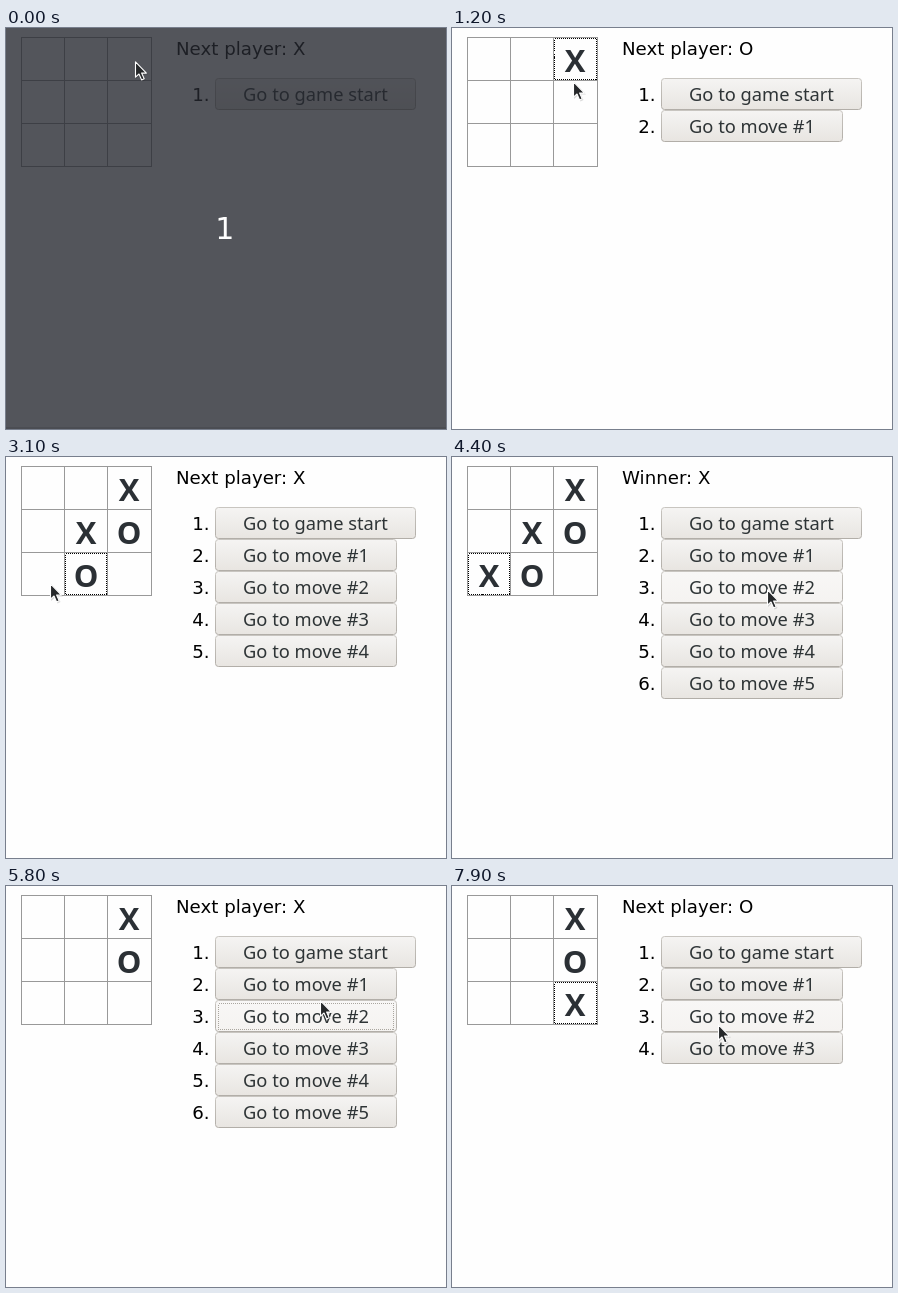
Write an HTML page that moves like this. It is 440x401 px and loops after 8 s.

```html
<!DOCTYPE html>
<html lang="en">
<head>
<meta charset="utf-8">
<title>Tic-tac-toe with move history</title>
<style>
  html, body { margin: 0; width: 100%; height: 100%; overflow: hidden; background: #fefefe; }
  svg { display: block; }
  text { white-space: pre; }
  .info { font: 18.2px "DejaVu Sans", sans-serif; }
  .label { font: 18.3px "Noto Sans", "Open Sans", sans-serif; fill: #2e3436; text-anchor: middle; }
  .mark { font: bold 31px "Noto Sans", "Open Sans", sans-serif; fill: #2b3035; text-anchor: middle; }
  .count { font: 30px "DejaVu Sans", sans-serif; fill: #fff; text-anchor: middle; }
  .end { text-anchor: end; }
  .focus { fill: none; stroke-dasharray: 1 1; shape-rendering: crispEdges; }
</style>
</head>
<body>
<svg width="440" height="401" viewBox="0 0 440 401">
  <defs>
    <linearGradient id="face" x2="0" y2="1">
      <stop stop-color="#f5f4f3"/><stop offset="1" stop-color="#e8e5e1"/>
    </linearGradient>
    <linearGradient id="hover" x2="0" y2="1">
      <stop stop-color="#f8f7f6"/><stop offset="1" stop-color="#f5f3f1"/>
    </linearGradient>
    <linearGradient id="edge" x2="0" y2="1">
      <stop stop-color="#c8c5c0"/><stop offset="1" stop-color="#b2aea8"/>
    </linearGradient>
  </defs>
  <g id="page"></g>
  <g id="countdown">
    <rect width="440" height="401" fill="rgb(38,40,47)" fill-opacity=".79"/>
    <rect y="399" width="440" height="2" fill="#4b4d53"/>
    <text class="count" x="218.8" y="211">1</text>
  </g>
  <g id="cursor">
    <path d="M1 1V18L5 14.5 7.5 20.5 10.5 19 8 13.5H13Z" fill="#000" opacity=".14"/>
    <path d="M.5 .8V16.2L4 13 6.6 18.9 9.2 17.8 6.6 12.1H11.4Z"
          fill="#26282a" stroke="#fff" stroke-width="1.1" stroke-linejoin="round"/>
  </g>
</svg>
<script>
const LOOP = 8000, TICK = 100;
const ROW_TOP = 50, ROW_HEIGHT = 32, LIST_X = 209;
const cellX = [16, 59, 102], cellY = [10, 53, 96];

const firstGame = [2, 5, 4, 7, 6];
const secondGame = [2, 5, 8];

// first step, last step, destination x, y
const moves = [
  [0, 0, 129, 33], [100, 100, 126, 30], [200, 200, 122, 27],
  [1100, 1300, 120, 62], [1600, 1800, 73, 76],
  [2400, 2400, 80, 104], [2600, 2600, 83, 122],
  [3000, 3100, 44, 126], [4000, 4400, 315, 132],
  [4600, 4600, 316, 150], [4800, 4900, 315, 167], [5000, 5100, 315, 156],
  [5300, 5400, 315, 132], [5700, 5800, 314, 114],
  [6300, 6700, 117, 122], [7300, 7600, 269, 120], [7800, 7900, 266, 138]
];

const events = [
  { at: 0, game: firstGame, played: 0, step: 0, cell: -1, button: -1 },
  { at: 700, cell: 2 }, { at: 900, played: 1, step: 1 },
  { at: 1400, cell: 5 }, { at: 1500, played: 2, step: 2 },
  { at: 2100, cell: 4 }, { at: 2300, played: 3, step: 3 },
  { at: 2800, cell: 7 }, { at: 2900, played: 4, step: 4 },
  { at: 3700, cell: 6 }, { at: 3900, played: 5, step: 5 },
  { at: 4800, cell: -1, button: 3 }, { at: 4900, step: 3 },
  { at: 5500, button: 2 }, { at: 5600, step: 2 },
  { at: 7100, game: secondGame, played: 3, step: 3, cell: 8, button: -1 }
];

const byId = id => document.getElementById(id);
const text = (cls, x, y, value) => `<text class="${cls}" x="${x}" y="${y}">${value}</text>`;
const focusRing = (x, y, w, h, color) =>
  `<rect class="focus" x="${x + .5}" y="${y + .5}" width="${w - 1}" height="${h - 1}" stroke="${color}"/>`;

function cursorAt(time) {
  let x = 0, y = 0;
  for (const [first, last, toX, toY] of moves) {
    if (time < first) break;
    const steps = (last - first) / TICK + 1;
    const p = Math.min(1, ((time - first) / TICK + 1) / steps);
    const eased = p * p * (3 - 2 * p);
    x += (toX - x) * eased;
    y += (toY - y) * eased;
  }
  return { x, y };
}

function board({ game, step, cell }) {
  let out = '<path d="M15.5 9V139M58.5 9V139M101.5 9V139M145.5 9V139' +
    'M15 9.5H146M15 52.5H146M15 95.5H146M15 138.5H146" stroke="#999"/>';
  game.slice(0, step).forEach((spot, i) => {
    const col = spot % 3, row = Math.floor(spot / 3);
    out += text("mark", 37 + 43 * col, 44 + 43 * row, i % 2 ? "O" : "X");
  });
  if (cell >= 0) {
    const col = cell % 3;
    out += focusRing(cellX[col], cellY[Math.floor(cell / 3)], col === 2 ? 43 : 42, 42, "#000");
  }
  return out;
}

function historyRow(i, hovered, focused) {
  const y = ROW_TOP + ROW_HEIGHT * i, width = i ? 182 : 201;
  const label = i ? `Go to move #${i}` : "Go to game start";
  return text("info end", 203.5, y + 23, `${i + 1}.`) +
    `<rect x="${LIST_X + .5}" y="${y + .5}" width="${width - 1}" height="${ROW_HEIGHT - 1}" rx="3"
      fill="url(#${hovered ? "hover" : "face"})" stroke="url(#edge)"/>` +
    (focused ? focusRing(LIST_X + 3, y + 3, width - 6, ROW_HEIGHT - 5, "#aaa69f") : "") +
    text("label", LIST_X + width / 2, y + 23, label);
}

function draw(time) {
  const state = Object.assign({}, ...events.filter(e => e.at <= time));
  const { x, y } = cursorAt(time);
  const hoverRow = x >= LIST_X ? Math.floor((y - ROW_TOP) / ROW_HEIGHT) : -1;
  const status = state.step === 5 ? "Winner: X" : `Next player: ${state.step % 2 ? "O" : "X"}`;

  let page = board(state) + text("info", 170, 27, status);
  for (let i = 0; i <= state.played; i++) {
    page += historyRow(i, i === hoverRow, i === state.button);
  }
  byId("page").innerHTML = page;
  byId("countdown").style.display = time < 100 ? "" : "none";
  byId("cursor").setAttribute("transform", `translate(${Math.round(x)} ${Math.round(y)})`);
}

const start = performance.now();
let shown = -1;
function frame() {
  const elapsed = (performance.now() - start) % LOOP;
  const time = Math.floor(elapsed / TICK) * TICK;
  if (time !== shown) draw(shown = time);
  requestAnimationFrame(frame);
}
frame();
</script>
</body>
</html>
```
